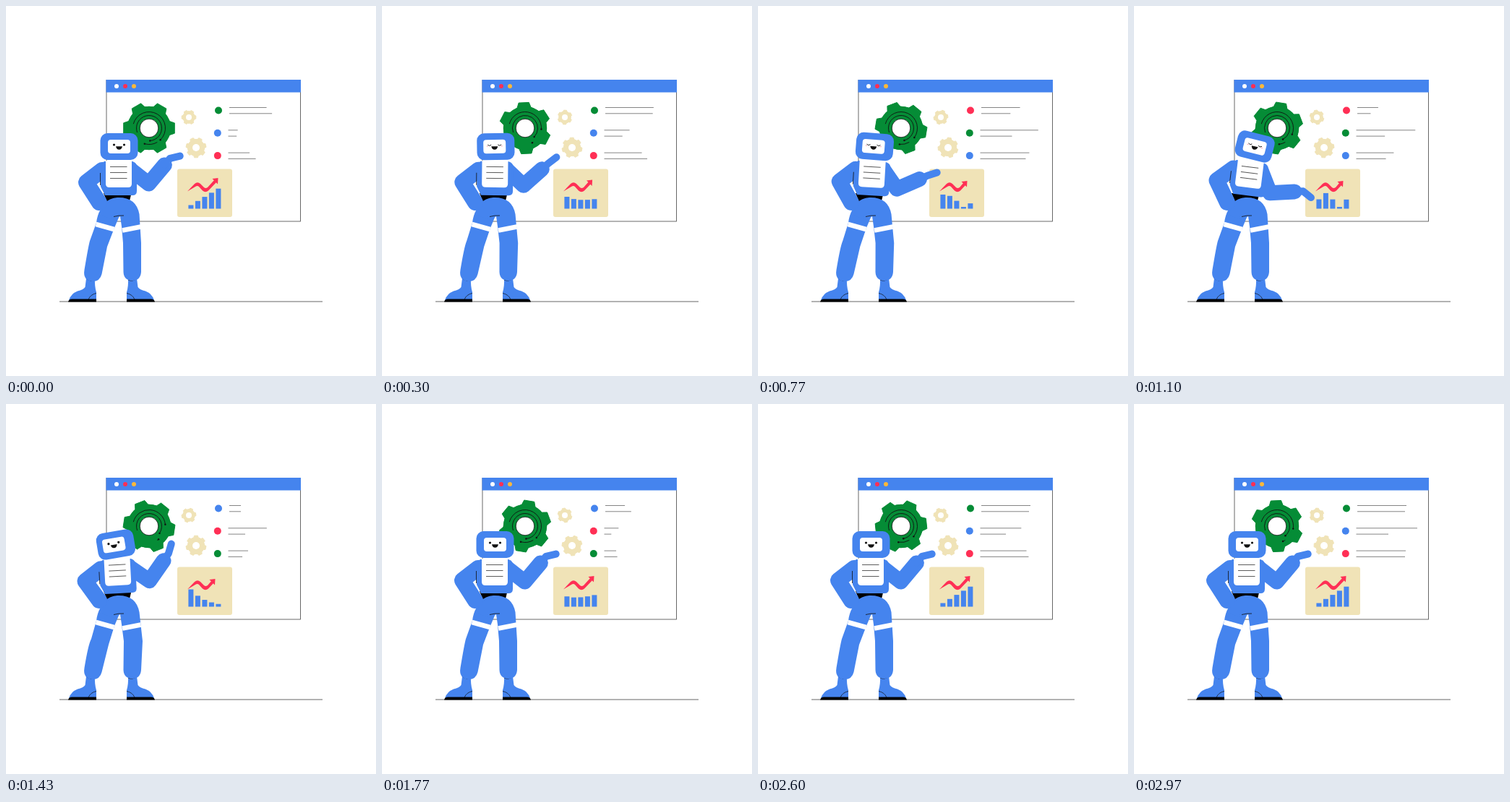
These frames come from a looping animation (512x512 px, 3 s). An HTML page:

```html
<!DOCTYPE html>
<html>
<head>
<meta charset="utf-8">
<style>
html, body { margin: 0; width: 100%; height: 100%; overflow: hidden; background: #fff; }
svg { display: block; width: 100vw; height: 100vh; }
</style>
</head>
<body>
<svg viewBox="0 0 512 512">
  <path d="M74 409H438" stroke="#555" stroke-width=".9"/>
  <rect x="139" y="102.5" width="268.5" height="195.5" fill="#fff" stroke="#444" stroke-width=".8"/>
  <path d="M138.5 102H408V119.5H138.5Z" fill="#4584ee"/>
  <circle cx="153" cy="111" r="3" fill="#fff"/>
  <circle cx="165" cy="111" r="3" fill="#ff2f55"/>
  <circle cx="177" cy="111" r="3" fill="#fbb83a"/>
  <rect x="237" y="225.5" width="76" height="66.5" rx="3" fill="#f0e3b7"/>
  <g id="scene" fill="none"></g>
</svg>
<script>
const LOOP = 3000, TURN = 2 * Math.PI;
const BLUE = '#4584ee', GREEN = '#058c36', RED = '#ff2f55', CREAM = '#f0e3b7', INK = '#111';
const scene = document.getElementById('scene');

// Eased progress from 0 to 1 between two times.
function ease(t, from, to) {
  const u = Math.min(1, Math.max(0, (t - from) / (to - from)));
  return (1 - Math.cos(Math.PI * u)) / 2;
}

const shape = (d, fill) => `<path d="${d}" fill="${fill}"/>`;
const line = (d, color, width = 1, extra = '') =>
  `<path d="${d}" stroke="${color}" stroke-width="${width}" ${extra}/>`;
const limb = (d, width) => line(d, BLUE, width, 'stroke-linecap="round" stroke-linejoin="round"');
const disc = (x, y, r, fill) => `<circle cx="${x}" cy="${y}" r="${r}" fill="${fill}"/>`;
const polar = (r, deg) => [r * Math.sin(deg * TURN / 360), -r * Math.cos(deg * TURN / 360)];

function gear(x, y, r, hole, teeth, color, angle) {
  const pts = [], step = 360 / teeth;
  for (let i = 0; i < teeth; i++) {
    const a = angle + (i + .5) * step;
    pts.push(polar(r * .83, a - step * .31), polar(r, a - step * .19),
      polar(r, a + step * .19), polar(r * .83, a + step * .31));
  }
  return `<g transform="translate(${x} ${y})">` +
    `<path d="M${pts.join('L')}Z" fill="${color}" stroke="${color}" stroke-linejoin="round"/>` +
    disc(0, 0, r * .84, color) + disc(0, 0, hole, '#fff') + '</g>';
}

// Circuit trace around the large gear: an arc ending in a dot.
function trace(r, from, to) {
  const [x, y] = polar(r, to);
  const big = to - from > 180 ? 1 : 0;
  return line(`M${polar(r, from)}A${r} ${r} 0 ${big} 1 ${x} ${y}`, INK, .9) + disc(x, y, 1.2, INK);
}

function gears(t) {
  const a = t * .09, sway = 108 + 28 * Math.cos(TURN * t / 900);
  return gear(198, 169, 36, 12.7, 6, GREEN, a) +
    '<g transform="translate(198 169)">' +
    trace(22.5, -75, sway) + trace(22.5, 150, sway + 60) + trace(17.5, -110, sway + 40) +
    `<circle r="12.8" stroke="${INK}" stroke-width=".8"/></g>` +
    gear(253, 154, 10, 4, 6, CREAM, -a) +
    gear(263, 196, 14, 5, 7, CREAM, -a);
}

// A line's end swings once per period; the last swing stops at its peak.
function swing(t, peak, mid, reach) {
  const period = 2100;
  return mid + reach * Math.cos(TURN * (Math.min(t, peak + period) - peak) / period);
}

function list(t) {
  const colors = [GREEN, BLUE, RED];
  const shift = 3 - Math.min(3, Math.floor(t / 700));
  const row = (i, x, end1, end2) => {
    const y = 144.5 + i * 31.3;
    return disc(i ? 292.8 : 294, y, 5, colors[(i + shift) % 3]) +
      line(`M${x} ${y - 4}H${end1}M${x} ${y + 4.3}H${end2}`, '#777', .9);
  };
  return row(0, 309, swing(t, 400, 351, 26), swing(t, 250, 349, 26)) +
    row(1, 307.5, swing(t, 950, 356, 37), swing(t, 850, 334, 18)) +
    row(2, 307.5, swing(t, 700, 350, 26), swing(t, 570, 349, 26));
}

function chart(t) {
  const fall = ease(t, 0, 530) - ease(t, 1430, 2100);
  const shuffle = ease(t, 530, 1080) - ease(t, 1120, 1430);
  const bars = [0, 1, 2, 3, 4].map(i => {
    const rising = 5 + 5.7 * i, falling = 24 * .63 ** i;
    const h = rising + (falling - rising) * fall - 11 * Math.cos(2.2 * i) * shuffle;
    const x = 252.4 + 9.5 * i;
    return shape(`M${x} 280.5V${280.5 - Math.max(2.5, h)}h7V280.5Z`, BLUE);
  }).join('');
  const rise = 1 - ease(t, 0, 530) + ease(t, 1430, 1770);
  const x = 287.5 + 4 * rise, y = 244.5 - 4 * rise;
  return bars +
    shape(`M251 256.5L261 246Q265 242.5 269 246L274 251Q276 253 279 251L${x - 3} ${y}L${x} ${y + 3}` +
      'L280 255.5Q276 259 272 255.5L267 250Q265 248 262 250Z', RED) +
    shape(`M${x - 6} ${y - 1.5}L${x + 2} ${y - 2.5}L${x + 1.5} ${y + 6}Z`, RED);
}

// Key poses in degrees (knee: share of full shift); the last returns to rest.
const rest = { at: 0, lean: 0, knee: 0, forearm: -50, finger: -13 };
const poses = [
  rest,
  { at: 530, lean: 1, knee: 1, forearm: -36, finger: -53 },
  { at: 1100, lean: 7, knee: 0, forearm: -3, finger: 39 },
  { at: 1430, lean: -3, knee: 1, forearm: -55, finger: -74 },
  { ...rest, at: 1620 }
];
function poseAt(t) {
  const p = {};
  for (const key in rest) {
    p[key] = rest[key];
    for (let i = 1; i < poses.length; i++)
      p[key] += (poses[i][key] - poses[i - 1][key]) * ease(t, poses[i - 1].at, poses[i].at);
  }
  return p;
}

function legs(knee) {
  const k = 2 * knee;
  const boot = shape('M111 377L109.5 389Q107 392.5 99 394.5Q90 398 87 407H125V396Q122.5 388 123 377Z', BLUE) +
    line('M114 406Q117 399 125 397.5M111 377Q117 382 123 379', INK, .7) +
    shape('M86 409.5Q87 405.5 91 405.5H125V409.5Z', '#000');
  return boot + `<g transform="translate(292 0) scale(-1 1)">${boot}</g>` +
    shape('M135 259H173.5L170 274H141Z', '#000') +
    shape(`M131 281Q126 290 125 300L${116 + k} 325Q114 332 108.5 365Q106 380 120 381Q130 381 132.5 371L${140 + k} 333L150 307L158 288Z`, BLUE) +
    shape(`M129 289Q133 267 154 265Q180 264 184.5 288L${187 + k} 328L187 368Q186 380 175 380Q163 380 162.5 368L${162 + k / 2} 328L160 305L158 291L150 296Z`, BLUE) +
    line('M124.5 302L149.5 309M161 310.5L186.5 305.5', '#fff', 6.5) +
    line('M149 291.5Q156 289.5 163 290', INK, .8);
}

function head(p, awake) {
  const eyes = awake
    ? disc(149.5, 192, 1.6, INK) + disc(163.5, 192, 1.6, INK)
    : line('M147 192q2.5 2.5 5 0M161 192q2.5 2.5 5 0', INK, .9) +
      line('M145.5 194h2M165.5 194h2', '#ff8fa5', .8);
  const tilt = 2 * p.lean - 3.5 * p.knee;
  return `<g transform="translate(${1.5 * p.lean} 0) rotate(${tilt} 156.5 195)">` +
    `<rect x="130.5" y="176" width="52" height="37" rx="10" fill="${BLUE}"/>` +
    `<g transform="translate(${-2.7 * p.knee} 0)">` +
    '<rect x="141" y="185" width="31" height="19" rx="4" fill="#fff"/>' + eyes +
    shape('M152 194.2H161Q160 198.8 156.5 198.8Q153 198.8 152 194.2Z', INK) + '</g></g>';
}

function robot(t) {
  const p = poseAt(t);
  const onTorso = (x, y) => {
    const [dx, dy] = [x - 155, y - 262], c = Math.cos(p.lean * TURN / 360), s = Math.sin(p.lean * TURN / 360);
    return [155 + dx * c - dy * s, 262 + dx * s + dy * c];
  };
  const reach = ([x, y], length, deg) => {
    const [dx, dy] = polar(length, deg + 90);
    return [x + dx, y + dy];
  };
  const elbow = [187.5 - .2 * p.forearm, 259.5 + .27 * p.forearm];
  const wrist = reach(elbow, 34, p.forearm);
  const palm = reach(wrist, 12, p.forearm);
  const tip = reach(palm, 14, p.finger);
  return legs(p.knee) +
    limb(`M${onTorso(133, 227)}L${111 + p.lean / 2} ${244 - .4 * p.lean}L129 272`, 22) +
    limb(`M${onTorso(172, 226)}L${elbow}L${wrist}`, 21) +
    limb(`M${wrist}L${palm}L${tip}`, 10) +
    `<g transform="rotate(${p.lean} 155 262)">` +
    shape('M136 215H175Q181 217 181 222V256Q181 262 175 262H137L131 250V219Z', BLUE) +
    line('M130.5 231V248', INK, .8) +
    shape('M147 209H168V214H174V246Q174 251 169 251H143Q138 251 138 246V214H147Z', '#fff') +
    line('M144 222.5H167.5M144 230.5H167.5M144 238.5H167.5', '#333', .8) + '</g>' +
    head(p, t < 300 || t > 1250);
}

function draw(now) {
  const t = now % LOOP;
  scene.innerHTML = gears(t) + list(t) + chart(t) + robot(t);
  requestAnimationFrame(draw);
}
draw(0);
</script>
</body>
</html>
```
